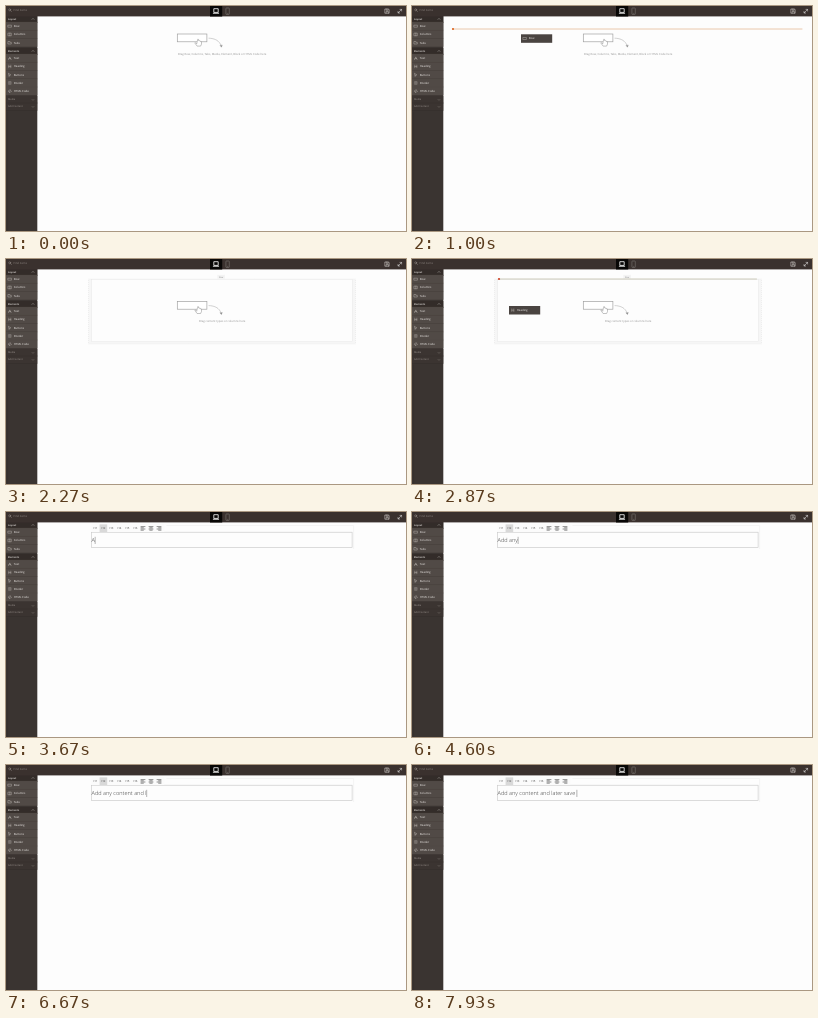
An HTML page that plays this animation: 400 by 225 pixels, repeating every 8 s.

```html
<!DOCTYPE html>
<html lang="en">
<head>
<meta charset="utf-8">
<title>Page builder</title>
<style>
html, body { margin: 0; width: 100%; height: 100%; overflow: hidden; background: #fdfdfd; }
svg { display: block; width: 100vw; height: 100vh; }
text { font-family: "Open Sans", "Noto Sans", sans-serif; font-size: 2.8px; text-rendering: geometricPrecision; white-space: pre; }
.line { fill: none; stroke-linecap: round; stroke-linejoin: round; }
#typed { font-size: 5.6px; font-weight: 300; fill: #333; }
</style>
</head>
<body>
<svg id="stage" viewBox="0 0 400 225" preserveAspectRatio="none"></svg>
<script>
const LOOP = 8000;
const stage = document.getElementById('stage');

const rect = (x, y, w, h, fill, extra = '') =>
  `<rect x="${x}" y="${y}" width="${w}" height="${h}" fill="${fill}" ${extra}/>`;
const text = (x, y, label, fill, extra = '') =>
  `<text x="${x}" y="${y}" fill="${fill}" ${extra}>${label}</text>`;
const path = (d, stroke, width = 0.5, extra = '') =>
  `<path class="line" d="${d}" stroke="${stroke}" stroke-width="${width}" ${extra}/>`;
const group = (id, content) => `<g id="${id}">${content}</g>`;

// Icons are drawn around their own centre.
const icons = {
  Row: 'M-1.6-1h3.2v2h-3.2z',
  Columns: 'M-1.5-1.3h3v2.6h-3zM0-1.3v2.6',
  Tabs: 'M-1.5-1.2h1.5v.8h1.5v1.7h-3z',
  Text: 'M-1.3 1.3L0-1.3 1.3 1.3M-.8.4H.8',
  Heading: 'M-1-1.3v2.6M1-1.3v2.6M-1 0h2',
  Buttons: 'M-1-1.2L1 .2 0 .4-.5 1.4z',
  Divider: 'M-1.5 0h3M-1.1-1.2h2.2M-1.1 1.2h2.2',
  'HTML Code': 'M-.7-1L-1.7 0l1 1M.7-1L1.7 0l-1 1M.3-1.2L-.3 1.2'
};
const item = (name, x, y) =>
  path(icons[name], '#c9c4c0', 0.4, `transform="translate(${x + 3.8} ${y + 4.2})"`) +
  text(x + 7.8, y + 5.2, name, '#f2efec');

function sidebarSection(title, y, names) {
  const chevron = names.length ? 'l1-1 1 1' : 'l1 1 1-1';
  const ink = names.length ? '#e8e4e0' : '#9a938e';
  return rect(0, y, 31.3, 7, names.length ? '#332c29' : '#3b3431') +
    text(2, y + 4.2, title, ink, `font-weight="${names.length ? 600 : 400}" style="font-size:2.5px"`) +
    path(`M26 ${y + 3.4}${chevron}`, ink, 0.35) +
    names.map((name, i) => rect(0, y + 6 + i * 8.25, 31.3, 8.25, '#514a46') +
      path(`M0 ${y + 6 + i * 8.25}h31.3`, '#48413d', 0.25) +
      item(name, 0, y + 6 + i * 8.25)).join('');
}

function chrome() {
  return rect(0, 0, 31.3, 225, '#3a3431') +
    path('M1.6 106V225', '#342e2b', 0.5) +
    sidebarSection('Layout', 10, ['Row', 'Columns', 'Tabs']) +
    sidebarSection('Elements', 42, ['Text', 'Heading', 'Buttons', 'Divider', 'HTML Code']) +
    sidebarSection('Media', 90, []) + sidebarSection('Add Content', 97, []) +
    path('M0 97h31.3M0 104.5h31.3', '#302a27', 0.35) +
    rect(0, 0, 400, 10.4, '#3a312e') +
    '<circle class="line" cx="3.7" cy="3.8" r="1" stroke="#aaa29e" stroke-width=".4"/>' +
    path('M4.5 4.6l1 1', '#aaa29e', 0.4) + text(7.5, 5, 'Find items', '#8d8581') +
    rect(204, 0, 12.2, 10.5, '#080706') +
    path('M207.8 6v-3.3h4.4V6zM207.3 7.3h5.4', '#fff', 0.8) +
    rect(219.9, 2, 3.4, 6.5, 'none', 'rx=".6" stroke="#85807c" stroke-width=".5"') +
    path('M221.2 7.4h.8', '#85807c', 0.4) +
    path('M379.2 3h3.2l.8.8V7.2h-4zM380.2 3v1.3h1.9V3M380.1 7.2V5.5h2.2v1.7', '#d6d2cf', 0.5) +
    path('M392.2 6.8l3.2-3.2M394 3.4h1.6V5M392 5.5v1.5h1.6', '#eee', 0.5);
}

const dropHint = label =>
  rect(171.3, 28, 29.6, 7.8, '#fff', 'stroke="#9c9c9c" stroke-width=".65"') +
  path('M190.4 37.6l-1.1-1.1q-.8.1 0 1.1l1.8 2.5h3.5l.9-2v-2.5q-.5-.9-1 0 0-1.1-1-.7-.1-1-1-.5l-.1-1.1q-.8-.6-.8.2z',
    '#888', 0.5, 'style="fill:#fff"') +
  path('M203 32.2q10 .5 12.2 8', '#999', 0.45, 'stroke-dasharray="1.2 .8"') +
  path('M214.2 39.6l1.2 1.6.8-1.8z', '#888', 0.35, 'style="fill:#888"') +
  text(216, 48.8, label, '#929292', 'text-anchor="middle"');

const dropLine = (x, y, end, color, dot) =>
  path(`M${x} ${y}H${end}`, color, 0.65) + `<circle cx="${x}" cy="${y}" r="1.1" fill="${dot}"/>`;

const chip = name => rect(0, 0, 31.2, 8.5, '#4a4441') + item(name, 0, 0);

const rowFrame =
  rect(82.5, 20, 267, 65, '#f6f6f6', 'stroke="#dedede" stroke-width=".4" stroke-dasharray="1 1"') +
  rect(85.6, 20.3, 260.8, 62, '#fdfdfd', 'stroke="#e3e3e3" stroke-width=".4"') +
  rect(211.3, 15.8, 7.6, 4, '#f3f3f3') +
  text(215.1, 18.6, 'Row', '#888', 'text-anchor="middle" style="font-size:2.2px"');

const alignIcon = (x, offsets) => path(offsets.map((dx, i) =>
  `M${x + dx} ${14.6 + i * 1.2}h${i % 2 ? 2.4 : 4}`).join(''), '#555', 0.65, 'stroke-linecap="butt"');
const toolbar =
  path('M161 13.5H347.6V36.5', '#e6e6e6', 0.4) +
  rect(85.3, 12.4, 73, 7.6, '#fbfbfb') + rect(93.6, 12.4, 7.6, 7.6, '#d9d9d9') +
  [1, 2, 3, 4, 5, 6].map(n => text(81.4 + n * 8, 17.4, 'H' + n, '#444', 'text-anchor="middle"')).join('') +
  alignIcon(135, [0, 0, 0, 0]) + alignIcon(143, [0, 0.8, 0, 0.8]) + alignIcon(151, [0, 1.6, 0, 1.6]);

stage.innerHTML = chrome() +
  group('pageHint', dropHint('Drag Row, Columns, Tabs, Media, Element, Block or HTML Code here')) +
  group('row', rowFrame + `<g transform="translate(0 14.4)">${dropHint('Drag content types or columns here')}</g>`) +
  group('heading', rect(85.5, 20.2, 260.6, 15.4, '#fdfdfd', 'stroke="#c6c6c6" stroke-width=".6"') +
    text(85.6, 30.1, '', '#333', 'id="typed"') +
    path('M0 25.2V31.6', '#444', 0.4, 'id="caret"')) +
  group('toolbar', toolbar) +
  group('rowLine', dropLine(41, 23, 390, '#dfaa80', '#dd6420')) +
  group('headingLine', dropLine(87, 20, 344.5, '#b9b59c', '#cf4227')) +
  group('rowChip', chip('Row')) + group('headingChip', chip('Heading'));

const part = Object.fromEntries([...stage.querySelectorAll('[id]')].map(el => [el.id, el]));

const rowDrag = [[870, 10, 20], [930, 64, 25.5], [1000, 109, 28.3], [1070, 128, 29.2], [1130, 139, 30], [1200, 143, 30]];
const headingDrag = [[2730, 9, 56], [2800, 58, 51], [2870, 97, 47], [2930, 102, 46.2]];
const message = 'Add any content and later save ';
const keyTimes = [3670, 3930, 4070, 4200, 4330, 4470, 4600, 4730,
  4870, 5000, 5070, 5200, 5330, 5400, 5470, 5530, 5730, 5870, 5930, 6070,
  6600, 6730, 6870, 7070, 7200, 7270, 7470, 7600, 7800, 7870, 7930];

const show = (el, opacity) => el.setAttribute('opacity', Math.max(0, Math.min(1, opacity)));
const during = (t, from, to) => t >= from && t < to ? 1 : 0;

function drag(el, steps, t, end) {
  const [, x, y] = steps.filter(step => step[0] <= t).pop() || steps[0];
  el.setAttribute('transform', `translate(${x} ${y})`);
  show(el, during(t, steps[0][0], end));
}

let shownText;
function type(t) {
  const count = keyTimes.filter(time => time <= t).length;
  const value = count ? message.slice(0, count) : 'Edit Heading Text';
  if (value !== shownText) {
    part.typed.textContent = shownText = value;
    part.typed.style.fill = count ? '#333' : '#aaa';
    const width = count ? part.typed.getComputedTextLength() : 0;
    part.caret.setAttribute('transform', `translate(${85.8 + width} 0)`);
  }
}

function render(t) {
  show(part.pageHint, during(t, 0, 1270));
  show(part.row, during(t, 1270, 3070));
  show(part.rowLine, during(t, 930, 1270));
  show(part.headingLine, during(t, 2800, 3070));
  show(part.heading, during(t, 3070, LOOP));
  show(part.toolbar, (t - 3070) / 200);
  drag(part.rowChip, rowDrag, t, 1270);
  drag(part.headingChip, headingDrag, t, 3070);
  type(t);
}

const start = performance.now();
function frame() {
  render((performance.now() - start) % LOOP);
  requestAnimationFrame(frame);
}
frame();
</script>
</body>
</html>
```
